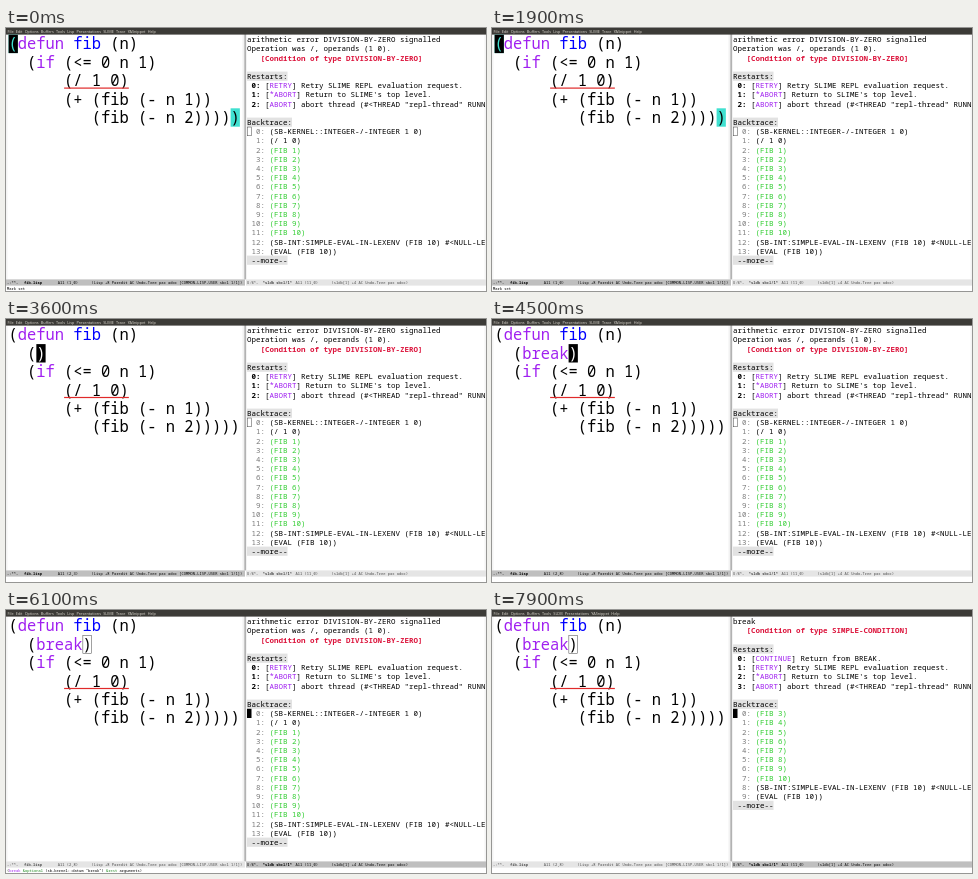
These frames come from a looping animation (480x263 px, 8000 ms). An HTML page with a canvas:

```html
<!DOCTYPE html>
<html lang="en">
<head>
<meta charset="utf-8">
<title>Lisp debugging session</title>
<style>
html, body { margin: 0; width: 100%; height: 100%; overflow: hidden; background: #fff; }
canvas { display: block; width: 100%; height: 100%; }
</style>
</head>
<body>
<canvas id="stage"></canvas>
<script>
const W = 480, H = 263, LOOP = 8000;
const MONO = '"Noto Sans Mono", "DejaVu Sans Mono", monospace';
const PURPLE = '#a020f0', BLUE = '#0000ff', GREEN = '#32cd32', RED = '#dc143c';
const GRAY = '#7a7a7a', TEAL = '#40e0d0', SHADE = '#e2e2e2';

const canvas = document.getElementById('stage');
const ctx = canvas.getContext('2d');
const dpr = window.devicePixelRatio || 1;
canvas.width = Math.round(W * dpr);
canvas.height = Math.round(H * dpr);

// Text grids: origin, cell width, line height; the font advances 0.6 em
const grid = (x, y, cw, lh) => ({ x, y, cw, lh, size: cw / 0.6 });
const CODE = grid(2.6, 6.7, 9.25, 18.4);
const DEBUG = grid(241, 6.8, 4.5, 9.2);
const TINY = grid(0, 0, 2.25, 4.6);

// Moments of the session, in ms
const T = { lineEnd: 2650, match: 2800, newline: 3200, parens: 3500, typing: 3700,
            key: 150, compiled: 4800, focus: 5800, breakHit: 6900 };

function rect(x, y, w, h, color) {
  ctx.fillStyle = color;
  ctx.fillRect(x, y, w, h);
}

// Each run is [text, color, bold]; columns stay on the monospace grid
function runs(list, x, base, font) {
  let col = 0;
  for (const [text, color = '#000', bold] of list) {
    ctx.font = (bold ? 'bold ' : '') + font.size + 'px ' + MONO;
    ctx.fillStyle = color;
    ctx.fillText(text, x + col * font.cw, base);
    col += text.length;
  }
}

function row(g, n, list, col = 0) {
  runs(list, g.x + col * g.cw, g.y + n * g.lh + g.lh * 0.8, g);
}

function cell(g, n, col, color, count = 1) {
  rect(g.x + col * g.cw, g.y + n * g.lh, g.cw * count, g.lh, color);
}

function hollow(g, n, col) {
  ctx.strokeStyle = '#444';
  ctx.lineWidth = 0.5;
  ctx.strokeRect(g.x + col * g.cw + 0.25, g.y + n * g.lh + 0.25, g.cw - 0.5, g.lh - 0.5);
}

function codeState(t) {
  if (t < T.lineEnd) return { line: 0, col: 0, under: '(', ink: TEAL };
  if (t < T.newline) return { line: 0, col: 14, under: '' };
  if (t < T.parens) return { line: 1, col: 2, under: '' };
  const typed = Math.max(0, Math.min(5, Math.floor((t - T.typing) / T.key) + 1));
  return { line: 1, col: 3 + typed, under: ')', extra: 'break'.slice(0, typed) };
}

function drawCode(t, s) {
  const shift = t >= T.newline ? 1 : 0;
  if (t < T.match) {
    cell(CODE, 0, 0, TEAL);
    cell(CODE, 4, 24, TEAL);
  } else if (!shift) {
    cell(CODE, 0, 11, TEAL);
    cell(CODE, 0, 13, TEAL);
  }
  row(CODE, 0, [['('], ['defun', PURPLE], [' '], ['fib', BLUE], [' (n)']]);
  if (s.extra !== undefined)
    row(CODE, 1, [['('], [s.extra, s.extra === 'break' ? PURPLE : '#000'], [')']], 2);
  row(CODE, 1 + shift, [['('], ['if', PURPLE], [' (<= 0 n 1)']], 2);
  row(CODE, 2 + shift, [['(/ 1 0)']], 6);
  row(CODE, 3 + shift, [['(+ (fib (- n 1))']], 6);
  row(CODE, 4 + shift, [['(fib (- n 2)))))']], 9);
  rect(CODE.x + 6 * CODE.cw, CODE.y + (2 + shift) * CODE.lh + 16, 7 * CODE.cw, 1.2, '#e02a2a');

  if (t < T.focus) {
    cell(CODE, s.line, s.col, '#000');
    row(CODE, s.line, [[s.under, s.ink || '#fff']], s.col);
  } else {
    hollow(CODE, s.line, s.col);
  }
}

function fibFrames(from, to, first) {
  const out = [];
  for (let i = from; i <= to; i++) out.push([first + i - from, '(FIB ' + i + ')', GREEN]);
  return out;
}

const EVAL = '(SB-INT:SIMPLE-EVAL-IN-LEXENV (FIB 10) #<NULL-LEXENV>)';
const THREAD = ' abort thread (#<THREAD "repl-thread" RUNNING>)';
const ERROR = {
  message: ['arithmetic error DIVISION-BY-ZERO signalled', 'Operation was /, operands (1 0).'],
  type: 'DIVISION-BY-ZERO',
  restarts: [['RETRY', ' Retry SLIME REPL evaluation request.'],
             ['*ABORT', " Return to SLIME's top level."], ['ABORT', THREAD]],
  frames: [[0, '(SB-KERNEL::INTEGER-/-INTEGER 1 0)'], [1, '(/ 1 0)'],
           ...fibFrames(1, 10, 2), [12, EVAL], [13, '(EVAL (FIB 10))']]
};
const BREAK = {
  message: ['break'],
  type: 'SIMPLE-CONDITION',
  restarts: [['CONTINUE', ' Return from BREAK.'], ...ERROR.restarts],
  frames: [...fibFrames(3, 10, 0), [8, EVAL], [9, '(EVAL (FIB 10))']]
};

function heading(n, text) {
  cell(DEBUG, n, 0, SHADE, text.length);
  row(DEBUG, n, [[text]]);
}

function drawDebugger(d, active) {
  ctx.save();
  ctx.beginPath();
  ctx.rect(240, 6, 239, 246);
  ctx.clip();
  let n = 0;
  for (const line of d.message) row(DEBUG, n++, [[line]]);
  row(DEBUG, n++, [['[Condition of type ' + d.type + ']', RED, true]], 3);
  heading(++n, 'Restarts:');
  n++;
  d.restarts.forEach(([name, text], i) =>
    row(DEBUG, n++, [[' ' + i + ':', '#000', true], [' ['], [name, PURPLE], [']' + text]]));
  heading(++n, 'Backtrace:');
  const top = ++n;
  for (const [i, text, color] of d.frames)
    row(DEBUG, n++, [[String(i).padStart(3) + ': ', GRAY], [text, color]]);
  heading(n, ' --more--');
  if (active) cell(DEBUG, top, 0, '#000');
  else hollow(DEBUG, top, 0);
  ctx.restore();
}

function modeline(x, w, active, parts) {
  rect(x, 251.4, w, 6.2, active ? '#bfbfbf' : '#e5e5e5');
  const color = active ? '#000' : '#4d4d4d';
  for (const [col, text, bold] of parts)
    runs([[text, color, bold]], x + 1 + col * TINY.cw, 255.8, TINY);
}

function drawMenu(middle) {
  rect(0, 0, W, 6.6, '#3c3b37');
  ctx.font = '3.8px "Open Sans", "Noto Sans", sans-serif';
  ctx.fillStyle = '#dfdbd2';
  let x = 1.5;
  for (const item of ['File', 'Edit', 'Options', 'Buffers', 'Tools', ...middle, 'YASnippet', 'Help']) {
    ctx.fillText(item, x, 4.5);
    x += ctx.measureText(item).width + 2.2;
  }
}

function drawEcho(t) {
  let list = [];
  if (t < T.lineEnd) list = [['Mark set']];
  else if (t >= T.compiled && t < T.focus)
    list = [['Compilation finished: 1 style-warning: [0.03 secs]']];
  else if (t >= T.focus && t < T.breakHit)
    list = [['('], ['break', PURPLE], [' '], ['&optional', '#228b22'],
            [' (sb-kernel::datum "break") '], ['&rest', '#228b22'], [' arguments)']];
  runs(list, 1, 261.6, TINY);
}

function draw(t) {
  ctx.setTransform(canvas.width / W, 0, 0, canvas.height / H, 0, 0);
  ctx.textBaseline = 'alphabetic';
  rect(0, 0, W, H, '#fff');
  rect(0, 6, 1.5, 245.4, '#f4f4f4');
  rect(236.5, 6, 4.5, 245.4, '#f2f2f2');
  rect(478.5, 6, 1.5, 245.4, '#f4f4f4');
  rect(238.6, 6, 1, 245.4, '#888');

  const right = t >= T.focus, hit = t >= T.breakHit;
  const s = codeState(t);
  drawMenu(hit ? ['SLDB', 'Presentations'] : ['Lisp', 'Presentations', 'SLIME', 'Trace']);
  drawCode(t, s);
  drawDebugger(hit ? BREAK : ERROR, right);
  modeline(0, 239, !right, [
    [0, '-:**-'], [7.5, 'fib.lisp', true], [22.5, 'All (' + (s.line + 1) + ',' + s.col + ')'],
    [37.5, '(Lisp +8 Paredit AC Undo-Tree pax adoc [COMMON-LISP-USER sbcl 1/1])']
  ]);
  modeline(240, 240, right, [
    [0, 'U:%*-'], [7, '*sldb sbcl/1*', true], [21.5, 'All (11,0)'],
    [37.5, '(sldb[1] +4 AC Undo-Tree pax adoc)']
  ]);
  drawEcho(t);
}

function tick() {
  draw(performance.now() % LOOP);
  requestAnimationFrame(tick);
}
tick();
</script>
</body>
</html>
```
